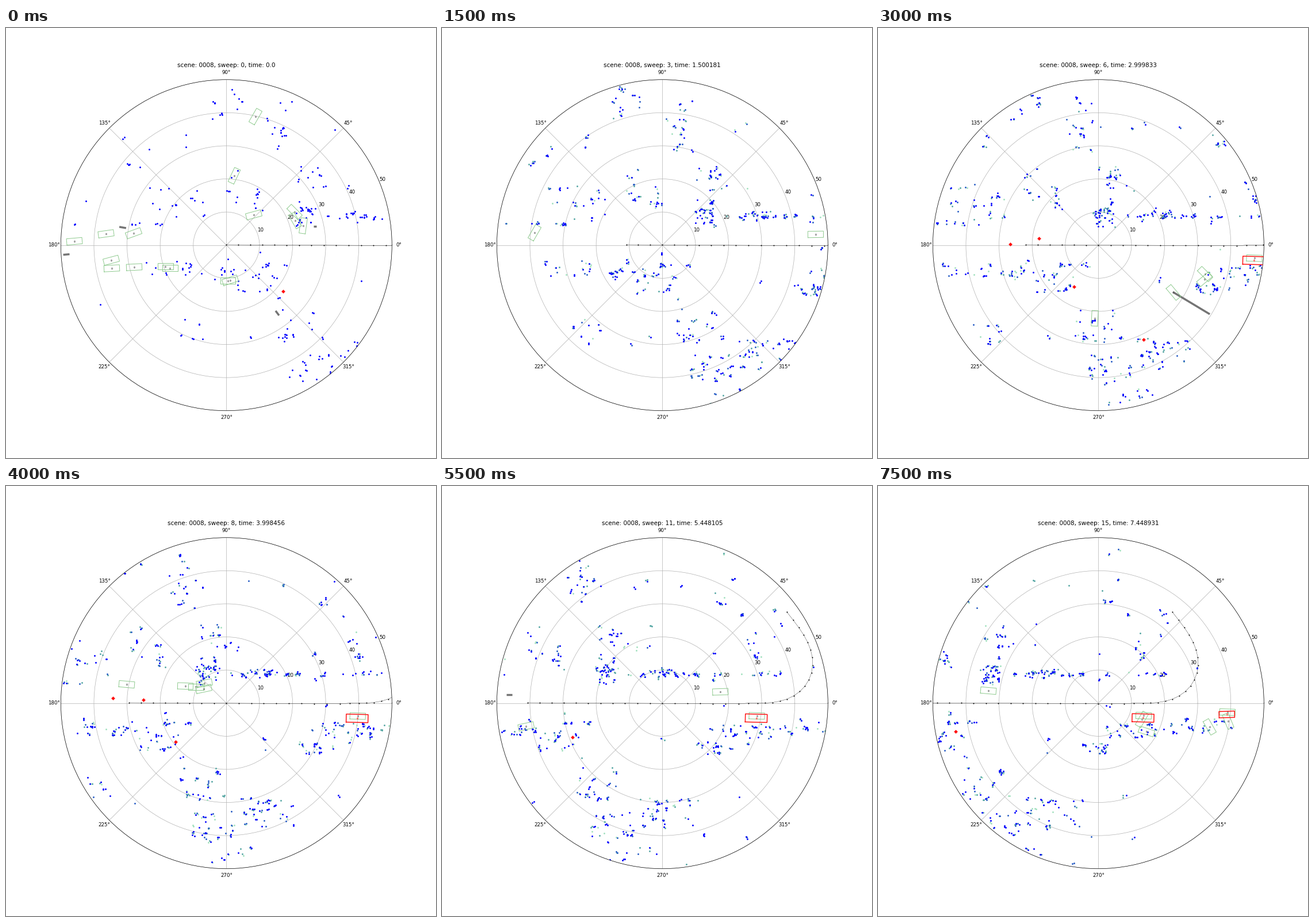
Recreate the animation shown at these times as a matplotlib script. Size 748x748 px, loop 8000 ms.

```python
import numpy as np
import matplotlib.pyplot as plt
from matplotlib.animation import FuncAnimation

SIZE, SWEEPS = 748, 16
CX, CY, RADIUS, RANGE = 383.35, 377.74, 288, 50
AGES = ['#0000ff', '#2a5fc6', '#5aa9a6', '#a5e2c0']
KEPT = [1, .42, .36, .26]   # share of a sweep's echoes still shown at each age
GREEN, RED, GREY = '#8cc98c', '#ff1010', '#747474'
TIMES = [0.0, 0.500194, 0.999871, 1.500181, 1.999926, 2.500138, 2.999833, 3.49921,
         3.998456, 4.498317, 4.947892, 5.448105, 5.948764, 6.449219, 6.949077, 7.448931]

# Fixed surroundings on the ground: x0, y0, x1, y1, visible echoes
LANDMARKS = [
    (555, 325, 825, 331, 60), (700, 412, 845, 438, 56), (680, 446, 718, 470, 30),
    (440, 410, 498, 414, 18), (235, 405, 400, 434, 52), (400, 422, 470, 460, 34),
    (502, 296, 540, 352, 60), (580, 318, 645, 336, 24), (165, 337, 320, 343, 16),
    (250, 272, 345, 335, 34), (425, 275, 445, 325, 14), (385, 242, 408, 300, 14),
    (340, 100, 410, 160, 26), (450, 110, 500, 225, 34), (505, 240, 600, 290, 30),
    (204, 200, 254, 255, 12), (560, 540, 670, 600, 60), (465, 485, 545, 545, 36),
    (495, 570, 560, 610, 26), (515, 600, 610, 655, 26), (298, 488, 355, 560, 16),
    (765, 205, 825, 305, 26), (708, 183, 733, 206, 10), (850, 405, 935, 430, 24),
    (60, 110, 1000, 660, 90)]

# Vehicles picked up near a sweep: x, y, heading
SIGHTINGS = {
    0: [(119, 371, 5), (174, 358, 8), (222, 357, 20), (183, 404, 15), (184, 418, 3),
        (223, 416, 3), (277, 415, 0), (285, 418, 0), (386, 440, 0), (390, 439, 18),
        (397, 257, 65), (434, 154, 60), (431, 325, 15), (502, 320, -45), (503, 335, -60),
        (517, 344, 82)],
    3: [(161, 356, 60), (650, 359, 1)],
    6: [(514, 460, -50), (569, 428, -45), (568, 437, 40), (377, 505, 87)],
    8: [(210, 345, -5), (312, 348, -2), (330, 349, 0), (344, 353, 12), (345, 343, 10)],
    10: [(168, 418, 12), (506, 358, 2)],
    13: [(234, 352, -7), (575, 405, -2)],
    15: [(192, 356, -5), (577, 419, -60), (609, 409, -68), (459, 406, 60), (467, 427, -18)]}
# Speed bars: sweep, x, y, length, heading
BARS = [(0, 203, 347, 12, -10), (0, 105, 394, 11, 5), (0, 538, 345, 5, 0),
        (0, 472, 496, 10, -53), (6, 545, 478.5, 75, -31), (10, 139, 363, 10, 0)]
# Followed objects: first sweep, last sweep, x, y, dx, dy
CARS = [(5, 15, 675, 404.5, -21.4, -.1, 38, 14, -1.5), (12, 15, 671, 398, -21.4, -.2, 27, 11, 2)]
WALKERS = [(0, 0, 482, 458, 0, 0), (5, 15, 363.9, 452.5, -22.9, -2.55),
           (6, 10, 280, 366, -20.3, 3.2), (6, 8, 230, 376, -22, -3.5), (6, 6, 462, 542, 0, 0)]


def odometer(k):
    return 20.8 * k + .045 * k ** 2


def make_echoes():
    """For every sweep, ground positions of a random choice of fixed reflectors."""
    rng = np.random.default_rng(8)
    spots = [rng.uniform((x0, y0), (x1, y1), (n // 2 + 2, 2)) for x0, y0, x1, y1, n in LANDMARKS]
    sweeps = []
    for _ in range(SWEEPS):
        xy = np.concatenate([rng.choice(s, row[4] // 2) for s, row in zip(spots, LANDMARKS)])
        sweeps.append(rng.permutation(xy + rng.normal(0, 1.8, xy.shape)))
    return sweeps


def make_route():
    """Straight drive, then a left turn of 128 degrees."""
    x = CX + odometer(np.arange(18))
    y = CY + .3 + .005 * (x - CX - odometer(10))
    s = np.arange(1, 18) / 17
    turn = np.radians(64 * (1 - np.cos(np.pi * s)))
    pace = 13 + 5 * s ** 6
    x0 = 461 + odometer(15)
    bend_x = x0 + np.append(0, np.cumsum(pace * np.cos(turn)))
    bend_y = CY - np.append(0, np.cumsum(pace * np.sin(turn)))
    return np.concatenate([x, [x0 - 16], bend_x]), np.concatenate([y, [CY], bend_y])


fig = plt.figure(figsize=(12, 12), dpi=SIZE / 12)
ax = fig.add_subplot(projection='polar')
ax.set_ylim(0, RANGE)
echoes = make_echoes()
route_x, route_y = make_route()
live = []


def polar(x, y):
    x, y = np.asarray(x, float) - CX, CY - np.asarray(y, float)
    return np.arctan2(y, x), np.hypot(x, y) * RANGE / RADIUS


def line(x, y, **style):
    live.extend(ax.plot(*polar(x, y), **style))


def box(x, y, length=27, width=11, heading=0, color=GREEN):
    a = np.radians(heading)
    u = np.array([-1, 1, 1, -1, -1]) * length / 2
    v = np.array([-1, -1, 1, 1, -1]) * width / 2
    line(x + u * np.cos(a) - v * np.sin(a), y - u * np.sin(a) - v * np.cos(a),
         color=color, lw=1.7 if color == RED else 1.1, zorder=3)
    line([x], [y], marker='s', ms=3.2, mfc='none', mew=.6,
         color=RED if color == RED else '#555555', zorder=3)


def bar(x, y, length, heading):
    a = np.radians(heading)
    u = np.array([-.5, .5]) * length
    line(x + u * np.cos(a), y - u * np.sin(a), color=GREY, lw=4,
         solid_capstyle='butt', zorder=2.9)


def draw_echoes(k):
    for age in range(min(k, 3), -1, -1):
        xy = echoes[k - age]
        xy = xy[:int(KEPT[age] * len(xy))] - [odometer(k), 0]
        th, r = polar(*xy[np.hypot(*(xy - [CX, CY]).T) < RADIUS].T)
        live.append(ax.scatter(th, r, s=11.5, c=AGES[age], linewidths=0, zorder=2.45))


def tracked(rows, k):
    for first, last, x, y, dx, dy, *shape in rows:
        if first <= k <= last:
            yield x + (k - first) * dx, y + (k - first) * dy, shape


def update(k):
    while live:
        live.pop().remove()
    ax.set_title(f'scene: 0008, sweep: {k}, time: {TIMES[k]}')
    line(route_x - odometer(k), route_y, color='black', lw=.4, marker='o', ms=2.3, mew=0, zorder=2.4)
    draw_echoes(k)
    key = min(SIGHTINGS, key=lambda s: abs(s - k))
    shift = odometer(key) - odometer(k)
    for s, x, y, length, heading in BARS:
        if s == key:
            bar(x + shift, y, length, heading)
    for x, y, heading in SIGHTINGS[key]:
        box(x + shift, y, heading=heading)
    for x, y, (length, width, heading) in tracked(CARS, k):
        box(x + 1, y - 4, heading=-2)
        box(x, y, length, width, heading, RED)
    for x, y, _ in tracked(WALKERS, k):
        line([x], [y], color=RED, marker='D', ms=5.5, mew=0, zorder=3)
    return live


anim = FuncAnimation(fig, update, frames=SWEEPS, init_func=lambda: [], interval=500,
                     repeat=True, repeat_delay=0)
plt.show()
```
